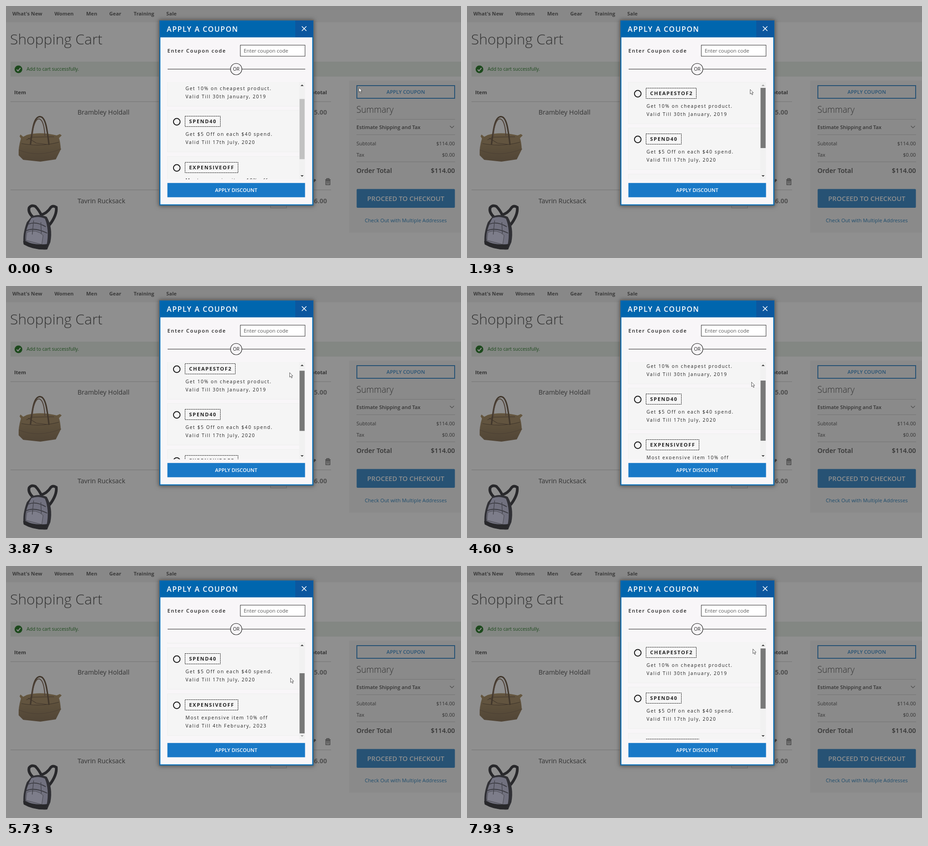
An HTML page with a canvas that plays this animation: 1005x557 px, repeating every 8 s.

```html
<!DOCTYPE html>
<html lang="en">
<head>
<meta charset="utf-8">
<title>Apply a coupon</title>
<style>
html, body { margin: 0; width: 100%; height: 100%; overflow: hidden; background: #8f8f8f; }
canvas { display: block; }
</style>
</head>
<body>
<canvas id="stage" width="1005" height="557"></canvas>
<script>
const stage = document.getElementById('stage');
const page = document.createElement('canvas');
page.width = 1005;
page.height = 557;
let c = page.getContext('2d');

const LOOP = 8000, STEP = 1000 / 15;
const LIST = { x: 357, y: 168, w: 303, h: 215, max: 89, pitch: 101.4 };
const COUPONS = [
  ['CHEAPESTOF2', 112, 'Get 10% on cheapest product.', 'Valid Till 30th January, 2019'],
  ['SPEND40', 79, 'Get $5 Off on each $40 spend.', 'Valid Till 17th July, 2020'],
  ['EXPENSIVEOFF', 118, 'Most expensive item 10% off', 'Valid Till 4th February, 2023']
];
// time, pointer x, pointer y, scroll
const KEYS = [
  [0, 779, 180, 39], [133, 752, 190, 39], [333, 655, 212, 39], [467, 598, 210, 39],
  [533, 607, 206, 39], [600, 607, 206, 39], [733, 628, 198, 39], [1000, 628, 198, 39],
  [1133, 628, 207, 39], [1267, 628, 207, 39], [1933, 625, 184, 0], [3333, 625, 184, 0],
  [3867, 626, 191, 10], [3933, 626, 191, 10], [4133, 627, 200, 24], [4200, 627, 200, 24],
  [4600, 628, 212, 44.5], [4733, 628, 219, 55], [4800, 628, 219, 55], [5333, 628, 241, 89],
  [5467, 628, 247, 89], [7067, 628, 247, 89], [7333, 630, 220, 67], [7400, 630, 220, 67],
  [7467, 631, 211, 57], [7533, 631, 206, 47], [7600, 631, 206, 47], [7733, 631, 194, 24],
  [7800, 631, 194, 24], [7933, 631, 183, 2]
];

function box(x, y, w, h, color) {
  c.fillStyle = color;
  c.fillRect(x, y, w, h);
}

function frame(x, y, w, h, color, line = 1) {
  c.strokeStyle = color;
  c.lineWidth = line;
  c.strokeRect(x + line / 2, y + line / 2, w - line, h - line);
}

function rule(x1, x2, y, color) {
  box(x1, y, x2 - x1, 1, color);
}

// y is the middle of the capitals
function text(str, x, y, size, color, weight = 400, align = 'left', gap = 0) {
  c.font = `${weight} ${size}px "Open Sans", sans-serif`;
  c.letterSpacing = gap + 'px';
  c.textAlign = align;
  c.fillStyle = color;
  c.fillText(str, x, Math.round(y + size * 0.357));
}

function path(d, fill, stroke, line = 1) {
  const p = new Path2D(d);
  if (fill) { c.fillStyle = fill; c.fill(p); }
  if (stroke) { c.strokeStyle = stroke; c.lineWidth = line; c.stroke(p); }
}

function circle(x, y, r, fill, stroke, line = 1) {
  c.beginPath();
  c.arc(x, y, r, 0, Math.PI * 2);
  if (fill) { c.fillStyle = fill; c.fill(); }
  if (stroke) { c.strokeStyle = stroke; c.lineWidth = line; c.stroke(); }
}

function drawPage() {
  const ink = '#333', blue = '#1979c3', line = '#c4c4c4';
  box(0, 0, 1005, 557, '#fff');
  box(0, 0, 1005, 36, '#f0f0f0');
  [["What's New", 14], ['Women', 107], ['Men', 177], ['Gear', 228], ['Training', 282], ['Sale', 354]]
    .forEach(([label, x]) => text(label, x, 17.5, 11.2, '#444', 700));
  text('Shopping Cart', 9, 73.5, 32, ink, 300);

  box(10, 123, 995, 33, '#e5efe5');
  circle(27.5, 140, 8.5, '#006400');
  path('M23.5 140.5 L26.5 143.5 L32 137', null, '#fff', 2);
  text('Add to cart successfully.', 45.5, 139.5, 10.4, '#006400');

  text('Item', 18, 191.5, 11.2, ink, 700);
  text('Subtotal', 709, 191.5, 11.2, ink, 700, 'right');
  rule(10, 718, 211, line);
  rule(10, 718, 406, line);
  text('Brambley Holdall', 158, 235, 14.4, ink);
  text('Tavrin Rucksack', 158, 431, 14.4, ink);
  text('$45.00', 709, 234.5, 14.4, '#757575', 700, 'right');
  text('$36.00', 709, 430.5, 14.4, '#757575', 700, 'right');
  frame(584, 421, 36, 26, '#c2c2c2');
  path('M673 394 L675 389 L682 382 L685 385 L678 392 Z', '#555');
  path('M705 384 H717 M708.5 383.5 V381.5 H713.5 V383.5', null, '#555', 1.6);
  path('M706.5 386 H715.5 V395 H706.5 Z M709.5 387 V393 M712.5 387 V393', null, '#555', 1.5);

  box(758, 165, 247, 336, '#f5f5f5');
  frame(774, 175, 218, 30, blue, 2);
  text('APPLY COUPON', 883, 190, 11.2, blue, 600, 'center');
  text('Summary', 774, 229, 19.2, ink, 300);
  rule(774, 992, 250, line);
  text('Estimate Shipping and Tax', 774, 268, 11.2, ink, 600);
  path('M980.5 265 L985 269.5 L989.5 265', null, '#666', 1.1);
  rule(774, 992, 284, line);
  [['Subtotal', '$114.00', 304.5], ['Tax', '$0.00', 329.5]].forEach(([label, sum, y]) => {
    text(label, 774, y, 11.2, ink);
    text(sum, 991.5, y, 11.2, ink, 400, 'right');
  });
  rule(774, 992, 344, line);
  text('Order Total', 774, 363.5, 14.4, ink, 600);
  text('$114.00', 991.5, 363.5, 14.4, ink, 600, 'right');
  c.fillStyle = blue;
  c.beginPath();
  c.roundRect(774.5, 404.5, 217, 41.5, 2);
  c.fill();
  text('PROCEED TO CHECKOUT', 883, 425.5, 14.6, '#fff', 600, 'center');
  text('Check Out with Multiple Addresses', 883, 474, 11.2, '#006bb4', 400, 'center');

  box(0, 0, 1005, 557, 'rgba(51,51,51,.55)');
  drawHoldall();
  drawRucksack();
}

function drawHoldall() {
  const body = c.createLinearGradient(0, 282, 0, 343);
  body.addColorStop(0, '#65573f');
  body.addColorStop(1, '#514536');
  path('M38 289 L32 284 L30 288 L33 293 Q27 312 28 330 L38 340 L76 344 L110 339 L121 317 Q120 300 117 292 L123 286 L119 283 L112 286 Q76 277 46 285 Z', body);
  path('M40 290 Q76 279 113 288 L116 300 Q76 311 34 303 Z', '#62543f');
  path('M34 304 Q78 312 117 301 M49 292 L67 303 L91 306 M45 296 L57 290 L106 289', null, '#40362c', 1.2);
  path('M54 306 C58 278 60 245 75 244.5 C88 245 91 274 95 307', null, '#41372c', 3.2);
  path('M58 288 C59 264 66 249 73 249.5 C82 251 85 270 86 287', null, '#51443a', 2.2);
  path('M28 318 Q70 336 122 316', null, '#4b4034', 1);
}

function drawRucksack() {
  const dark = '#28282b';
  path('M60 467 Q48 456 51 446 Q56 439 65 443 Q73 451 79 464', null, dark, 6);
  path('M76 462 Q90 459 99 445 Q104 440 111 445 Q113 462 96 484', null, dark, 6);
  path('M56 466 Q70 458 90 466 Q104 490 98 522 L91 538 Q63 540 39 526 Q36 505 46 478 Z', '#303035');
  path('M56 469 Q71 463 86 470 Q96 494 90 528 Q64 531 43 519 Q41 496 56 469 Z', '#71717f');
  path('M50 482 Q66 475 88 488 M44 497 Q62 488 91 502', null, '#39393f', 1.8);
  path('M46 500 Q67 492 82 507 L79 527 L44 518 Z', '#7d7d8a', '#49494f', 1);
  path('M38 519 Q63 530 93 526 L91 538 Q61 540 39 527 Z', dark);
  path('M61 474 L58 505 M77 478 L78 503', null, '#44444c', 1.4);
}

function drawDialog() {
  c.save();
  c.shadowColor = 'rgba(0,0,0,.5)';
  c.shadowBlur = 9.6;
  box(338, 31, 341.5, 410.5, '#0068b1');
  c.restore();
  frame(337.5, 30.5, 342.5, 411.5, '#6b6b6b', 1.5);
  box(339, 32, 339.5, 408.5, '#0068b1');
  box(341, 69, 335.5, 369.5, '#f8f6f8');
  box(339, 32, 339.5, 37.3, '#0066ae');
  box(639, 32, 39, 37, '#0b579f');
  path('M653.5 45 L663.5 55 M663.5 45 L653.5 55', null, '#fff', 1.6);
  text('APPLY A COUPON', 355, 51, 16, '#fff', 600, 'left', 1.6);

  text('Enter Coupon code', 356.5, 99.5, 11.2, '#222', 600, 'left', 1.6);
  box(517, 86, 144, 25, '#fff');
  frame(517, 86, 144, 25.5, '#333');
  text('Enter coupon code', 525, 99, 11.2, '#5c5c5c');
  rule(357, 661, 139, '#222');
  circle(508.5, 139.5, 12.5, '#f8f6f8', '#222', 1.2);
  text('OR', 508.5, 139.5, 10.4, '#222', 400, 'center');

  box(356.5, 391.2, 304, 31.5, '#1979c7');
  text('APPLY DISCOUNT', 508.5, 407, 11.2, '#fff', 600, 'center');
}

function drawCoupon([code, width, offer, until], y) {
  box(357, y, 291, 93, '#f5f5f5');
  frame(356, y, 293, 93, '#efefef');
  circle(377.2, y + 25.9, 7.3, null, '#1c1c1c', 2);
  c.save();
  c.setLineDash([3, 1]);
  frame(395, y + 13, width, 24, '#222');
  c.restore();
  text(code, 404.5, y + 25, 11.2, '#222', 700, 'left', 1.6);
  text(offer, 396.5, y + 53.5, 10.4, '#222', 400, 'left', 1.6);
  text(until, 396.5, y + 71, 10.4, '#222', 400, 'left', 1.6);
}

function drawList(scroll, thumb) {
  c.save();
  c.beginPath();
  c.rect(LIST.x - 1, LIST.y, LIST.w + 2, LIST.h);
  c.clip();
  COUPONS.forEach((item, i) => drawCoupon(item, Math.round(LIST.y + i * LIST.pitch - scroll)));
  box(647.5, 168, 13, 215, '#f1f1f1');
  box(648.4, 181 + scroll * 0.629, 11.2, 133, thumb);
  path('M650.5 177 L654 173.5 L657.5 177 Z', scroll > 0.5 ? '#444' : '#a3a3a3');
  path('M650.5 374 L654 377.5 L657.5 374 Z', scroll < LIST.max - 0.5 ? '#444' : '#a3a3a3');
  c.restore();
}

function drawPointer(x, y) {
  c.save();
  c.translate(Math.round(x), Math.round(y));
  path('M.5 .5 V10.5 L2.8 8.4 L4.6 12.3 L6.3 11.5 L4.6 7.8 H7.6 Z', '#fff', '#333', 0.8);
  c.restore();
}

function poseAt(t) {
  const i = KEYS.findIndex(k => k[0] > t);
  if (i < 0) return KEYS[KEYS.length - 1].slice(1);
  const a = KEYS[i - 1], b = KEYS[i], u = (t - a[0]) / (b[0] - a[0]);
  return [1, 2, 3].map(n => a[n] + (b[n] - a[n]) * u);
}

function thumbColor(t) {
  return t < 725 ? '#c1c1c1' : t < 1325 ? '#a8a8a8' : '#787878';
}

drawPage();
drawDialog();
c = stage.getContext('2d');

const start = performance.now();
function tick(now) {
  const time = Math.max(0, now - start) % LOOP;
  const t = Math.floor((time + 4) / STEP) * STEP % LOOP;
  const [x, y, scroll] = poseAt(t);
  c.drawImage(page, 0, 0);
  drawList(scroll, thumbColor(t));
  drawPointer(x, y);
  requestAnimationFrame(tick);
}
tick(start);
</script>
</body>
</html>
```
